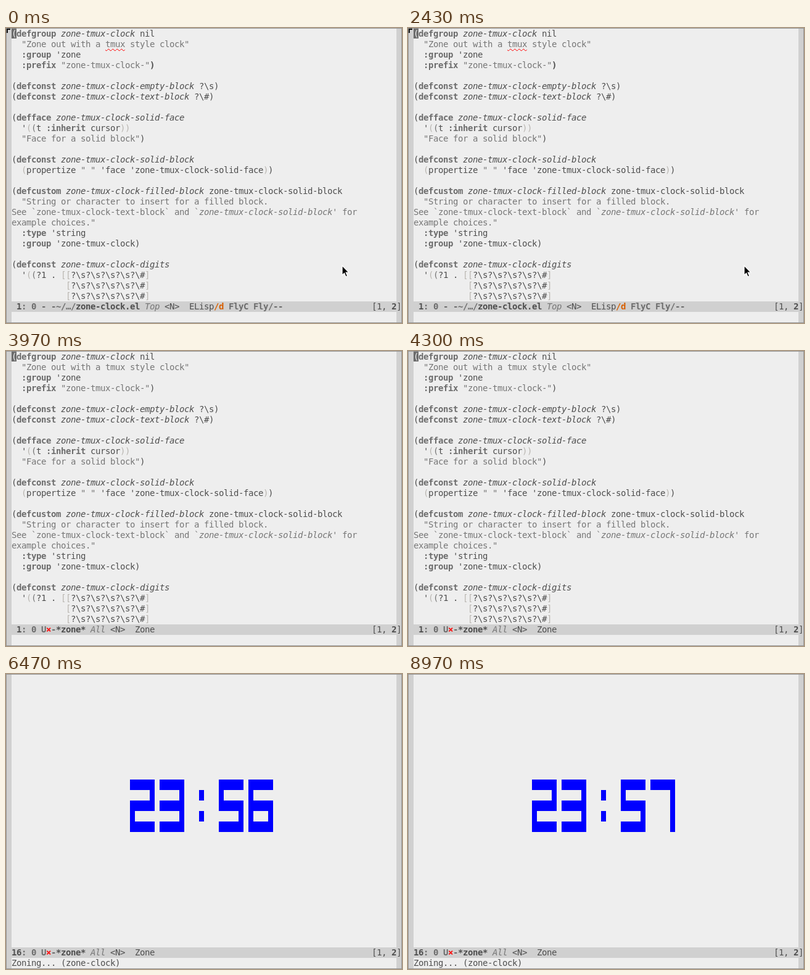
Recreate the animation shown at these times as an HTML page. Size 642 by 478 pixels, loop 9.01 s.

```html
<!DOCTYPE html>
<html lang="en">
<head>
<meta charset="utf-8">
<title>Zone clock</title>
<style>
html, body { margin: 0; width: 100%; height: 100%; overflow: hidden; }
#stage {
  position: relative; width: 642px; height: 478px; overflow: hidden;
  background: #eee; color: #4e4e4e;
  font: 14px/17px "DejaVu Sans Mono", monospace;
  letter-spacing: calc(8px - 1ch);
}
#stage > * { position: absolute; }
pre, .bar, .row {
  margin: 0; font: inherit; letter-spacing: inherit; white-space: pre; overflow: hidden;
}
.fringe { top: 0; width: 8px; height: 478px; background: #d0d0d0; }
.frame { inset: 0; border: 1px solid #949494; }
#code { left: 9px; top: 1px; width: 624px; height: 442px; }
.bar { left: 1px; width: 632px; height: 17px; padding-left: 8px; background: #d0d0d0; }
.bar .right { position: absolute; left: 592px; }
.row { left: 9px; width: 624px; height: 17px; }
b { color: #6c6c6c; font-weight: bold; }
b.dark { color: #4e4e4e; }
i { font-style: italic; }
s { text-decoration: none; color: #767676; }
u { text-decoration: none; color: #b8b5b0; }
em { color: #767676; }
.d { color: #d75f00; }
.x { color: #f00; }
.block { background: #6c6c6c; color: #eee; }
.hollow { box-shadow: inset 0 0 0 1px #6c6c6c; }
.typo { text-decoration: underline wavy #f00 1px; text-underline-offset: 2px; }
.count { background: #ffffaf; color: #303030; }
.pane { inset: 0; }
.pane > * { position: absolute; }
.head {
  left: 9px; top: 290px; width: 624px; height: 22px; background: #afd7f0; color: #000;
  font: bold 18.2px/22px "DejaVu Sans", sans-serif; letter-spacing: 0;
}
.pick { top: 312px; background: #afffcf; }
.list { left: 9px; top: 329px; width: 624px; height: 114px; }
.hide { display: none; }
</style>
</head>
<body>
<div id="stage">
<div class="fringe" style="left:1px"></div>
<div class="fringe" style="left:633px"></div>
<pre id="code"><span id="point">(</span><b>defgroup</b> <i>zone-tmux-clock</i> nil
  <s>"Zone out with a <span id="word">tmux</span> style clock"</s>
  <b>:group</b> 'zone
  <b>:prefix</b> <s>"zone-tmux-clock-"</s><span id="match">)</span>

(<b>defconst</b> <i>zone-tmux-clock-empty-block</i> ?\s)
(<b>defconst</b> <i>zone-tmux-clock-text-block</i> ?\#)

(<b>defface</b> <i>zone-tmux-clock-solid-face</i>
  '<u>(</u><s>(</s>t <b>:inherit</b> cursor<u>))</u>
  <s>"Face for a solid block"</s>)

(<b>defconst</b> <i>zone-tmux-clock-solid-block</i>
  <u>(</u>propertize <s>" "</s> 'face 'zone-tmux-clock-solid-face<u>)</u>)

(<b>defcustom</b> <i>zone-tmux-clock-filled-block</i> zone-tmux-clock-solid-block
  <s>"String or character to insert for a filled block.
See `zone-tmux-clock-text-block` and `<i>zone-tmux-clock-solid-block</i>' for
example choices."</s>
  <b>:type</b> 'string
  <b>:group</b> 'zone-tmux-clock)

(<b>defconst</b> <i>zone-tmux-clock-digits</i>
  '<u>(</u><s>(</s>?1 . <u>[[</u>?\s?\s?\s?\s?\#<u>]</u>
           <u>[</u>?\s?\s?\s?\s?\#<u>]</u>
           <u>[</u>?\s?\s?\s?\s?\#<u>]</u></pre>

<div id="editBar" class="bar"> <b class="dark">1</b><b>: 0 - -~/…/</b><b class="dark">zone-clock.el</b> <em>Top</em> &lt;N&gt;  ELisp<b class="d">/d</b> <b>FlyC Fly/--</b><span class="right">[1, <b class="dark">2</b>]</span></div>

<div id="zoneBar" class="bar" style="top:443px"><b id="line" class="dark"></b><b>: 0 U</b><b class="x">×</b><b>-</b><b class="dark">*zone*</b> <em>All</em> &lt;N&gt;  Zone<span class="right">[1, <b class="dark">2</b>]</span></div>

<div id="helm" class="pane">
<div class="head">M-x</div>
<div class="row pick"><span class="hollow">z</span>one-clock-preview</div>
<pre class="list">zone
undo-tree-visualize
customize-face
customize
customize-group
customize-variable
graphviz-dot-mode</pre>
<div class="bar" style="top:443px"><b class="dark">*helm-smex*</b> L1    <span class="count">[100 Candidate(s)]</span> C-c ?:Help TAB:Act RET/f1/f2/f-n:NthAct C-</div>
<div class="row" style="top:460px"><s>pattern: </s><span id="typed"></span><span class="block"> </span></div>
</div>

<div id="clock" class="pane">
<svg width="642" height="478" fill="#00f" shape-rendering="crispEdges"><path id="digits"/></svg>
<div class="row" style="top:460px">Zoning... (zone-clock)</div>
</div>

<svg id="pointer" style="left:543px;top:383px" width="16" height="24">
<path d="M2 2V17.5L5.5 14.2L8 20L10.6 18.9L8.1 13.2H12.8Z" fill="#000" stroke="#fff" stroke-width="1.2"/>
</svg>
<svg id="corner" style="left:0;top:0" width="9" height="9"><path d="M2 8V2H7" fill="none" stroke="#111" stroke-width="2"/></svg>
<div class="frame"></div>
</div>
<script>
const LOOP = 9010;
const AT = { helm: 3050, typed: 3300, zone: 3950, clock: 5000, minute: 7000 };

// Five rows per glyph, each row a 5-bit number.
const GLYPHS = {
  2: [31, 1, 31, 16, 31],
  3: [31, 1, 31, 1, 31],
  5: [31, 16, 31, 1, 31],
  6: [31, 16, 31, 17, 31],
  7: [31, 1, 1, 1, 1],
  ":": [0, 4, 0, 4, 0],
};

const $ = id => document.getElementById(id);
const show = (id, on) => $(id).classList.toggle("hide", !on);

function clockPath(text) {
  let path = "";
  [...text].forEach((char, n) => GLYPHS[char].forEach((bits, row) => {
    for (let col = 0; col < 5; col++) {
      if (bits >> (4 - col) & 1) {
        path += `M${201 + n * 48 + col * 8} ${171 + row * 17}h8v17h-8z`;
      }
    }
  }));
  return path;
}

const faces = ["23:56", "23:57"].map(clockPath);
let last = "";

function draw(t) {
  const helm = t >= AT.helm && t < AT.zone;
  const zone = t >= AT.zone;
  const clock = t >= AT.clock;

  show("code", !clock);
  show("editBar", !zone);
  show("zoneBar", zone);
  show("helm", helm);
  show("clock", clock);
  show("pointer", t < AT.helm);
  show("corner", !zone);

  $("code").style.height = helm ? "255px" : "442px";
  $("editBar").style.top = helm ? "256px" : "443px";
  $("point").className = helm ? "hollow" : "block";
  $("word").className = zone ? "" : "typo";
  $("match").style.fontWeight = zone ? "normal" : "bold";
  $("typed").textContent = t >= AT.typed ? "z" : "";
  $("line").textContent = clock ? "16" : " 1";
  $("digits").setAttribute("d", faces[+(t >= AT.minute)]);
}

function tick() {
  const t = performance.now() % LOOP;
  const key = Object.values(AT).filter(at => t >= at).length;
  if (key !== last) draw(t);
  last = key;
  requestAnimationFrame(tick);
}
tick();
</script>
</body>
</html>
```
